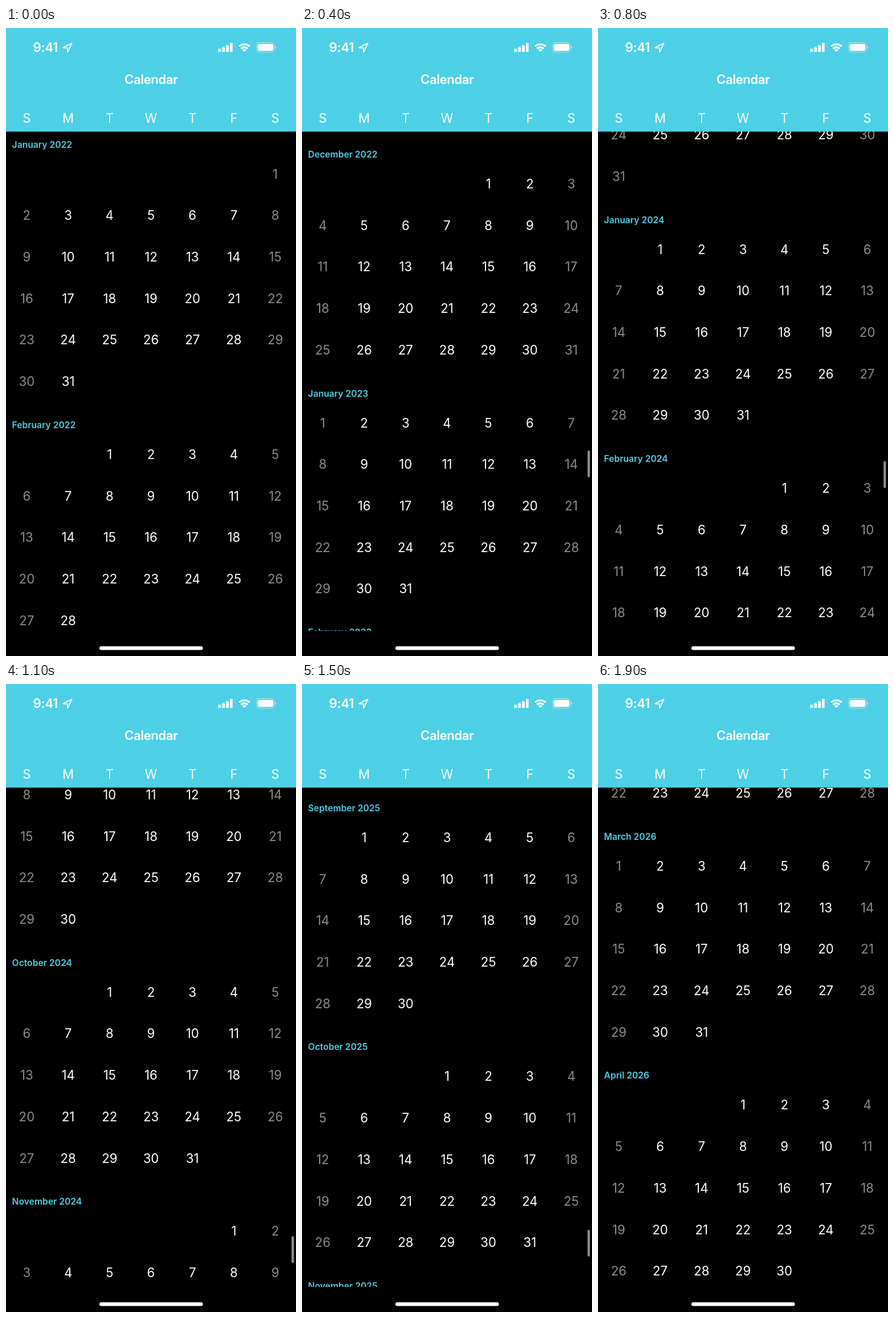
Recreate the animation shown at these times as an HTML page. Size 509x1100 px, loop 2 s.

```html
<!DOCTYPE html>
<html lang="en">
<head>
<meta charset="utf-8">
<title>Calendar</title>
<style>
  html, body { margin: 0; width: 100%; height: 100%; overflow: hidden; background: #000; }
  svg { display: block; width: 100%; height: 100%; font-family: Inter, Roboto, sans-serif; font-size: 22.2px; fill: #fff; }
  .mid { text-anchor: middle; }
  .off { fill: #8b8b8b; }
  .bold { font-weight: 600; }
  .month { font-weight: 600; font-size: 15.66px; fill: #4dd0e5; }
</style>
</head>
<body>
<svg viewBox="0 0 509 1100" preserveAspectRatio="none">
  <defs>
    <clipPath id="view"><rect y="181" width="509" height="875"/></clipPath>
  </defs>
  <rect width="509" height="1100" fill="#000"/>
  <g clip-path="url(#view)"><g id="list"></g></g>
  <rect id="bar" x="501.2" width="4.2" height="47" rx="2.1" fill="#8c8c8c"/>

  <rect width="509" height="181.5" fill="#4dd0e5"/>
  <text class="bold" x="47.5" y="42" letter-spacing="-.3">9:41</text>
  <path d="M115.6 26.6 L100.2 34.2 L107.6 35 L108.3 42.2 Z" fill="none" stroke="#fff" stroke-width="2" stroke-linejoin="round"/>
  <g id="signal"></g>
  <g fill="none" stroke="#fff" stroke-width="3.3">
    <path d="M408.9 32.4 A13.6 13.6 0 0 1 427.9 32.4"/>
    <path d="M412.6 36.2 A8.4 8.4 0 0 1 424.2 36.2"/>
  </g>
  <path d="M418.4 42 L414.9 38.5 A5 5 0 0 1 421.9 38.5 Z"/>
  <rect x="439.7" y="25.7" width="31.6" height="16.4" rx="5" fill="none" stroke="#fff" stroke-opacity=".45" stroke-width="1.2"/>
  <rect x="441.9" y="27.9" width="27.2" height="12" rx="3"/>
  <path d="M472.7 31.2 Q474.6 32 474.6 33.9 Q474.6 35.8 472.7 36.6 Z" opacity=".5"/>
  <text class="mid bold" x="254.7" y="97.8" letter-spacing="-.45">Calendar</text>
  <g id="week"></g>
  <rect x="164" y="1083" width="181.6" height="6.6" rx="3.3"/>
</svg>
<script>
const LOOP = 2000, STEP = 100, REST = 1800;
const COL = 509 / 7, HEAD = 55;
const NAMES = ["January", "February", "March", "April", "May", "June", "July",
  "August", "September", "October", "November", "December"];
const el = id => document.getElementById(id);
const text = (x, y, s, cls) => `<text x="${x.toFixed(2)}" y="${y.toFixed(2)}" class="${cls}">${s}</text>`;
const colX = c => (c + 0.5) * COL;

// Months stacked from January 2022, each as tall as its number of weeks.
const months = [];
for (let i = 0, top = 0; i < 56; i++) {
  const first = new Date(2022, i, 1).getDay();
  const days = new Date(2022, i + 1, 0).getDate();
  const height = HEAD + Math.ceil((first + days) / 7) * COL;
  months.push({ title: `${NAMES[i % 12]} ${2022 + Math.floor(i / 12)}`, first, days, top, height });
  top += height;
}

// Time, scroll offset, scroll speed, and scrollable length up to that time.
const keys = [
  [0, 0, 9, 7099],
  [400, 4805, 11.5, 7099],
  [600, 6926, 13.9, 8460],
  [800, 10350, 14.4, 14790],
  [1100, 14110.5, 12.5, 14790],
  [1500, 19131, 10.7, 20350],
  [REST, 21592.5, 2, 28467]
];

function scrollAt(t) {
  t = Math.min(t, REST);
  const i = Math.max(1, keys.findIndex(k => k[0] >= t));
  const [t0, p0, v0] = keys[i - 1], [t1, p1, v1, span] = keys[i];
  const d = t1 - t0, u = (t - t0) / d, w = 1 - u;
  const y = w * w * (1 + 2 * u) * p0 + u * u * (3 - 2 * u) * p1
    + d * u * w * (w * v0 - u * v1);
  return { y, span };
}

function drawMonth(m, y) {
  let out = text(10.6, y + 209.6, m.title, "month");
  for (let d = 1; d <= m.days; d++) {
    const cell = m.first + d - 1, c = cell % 7;
    out += text(colX(c), y + 263.6 + Math.floor(cell / 7) * COL, d, c % 6 ? "mid" : "mid off");
  }
  return out;
}

function draw(t) {
  const { y, span } = scrollAt(t);
  el("list").innerHTML = months
    .filter(m => m.top - y < 880 && m.top + m.height - y > -40)
    .map(m => drawMonth(m, m.top - y)).join("");
  el("bar").setAttribute("y", 185 + 820 * y / span);
  el("bar").setAttribute("visibility", t > 0 && t <= REST ? "visible" : "hidden");
}

el("week").innerHTML = [..."SMTWTFS"].map((s, c) => text(colX(c), 166.4, s, "mid")).join("");
el("signal").innerHTML = [5.5, 8.5, 12, 16].map((h, i) =>
  `<rect x="${372.6 + i * 6.8}" y="${42 - h}" width="4.7" height="${h}" rx="1.3"/>`).join("");

let last = -1;
const start = performance.now();
function tick() {
  const t = Math.floor((performance.now() - start) % LOOP / STEP) * STEP;
  if (t !== last) draw(last = t);
  requestAnimationFrame(tick);
}
tick();
</script>
</body>
</html>
```
